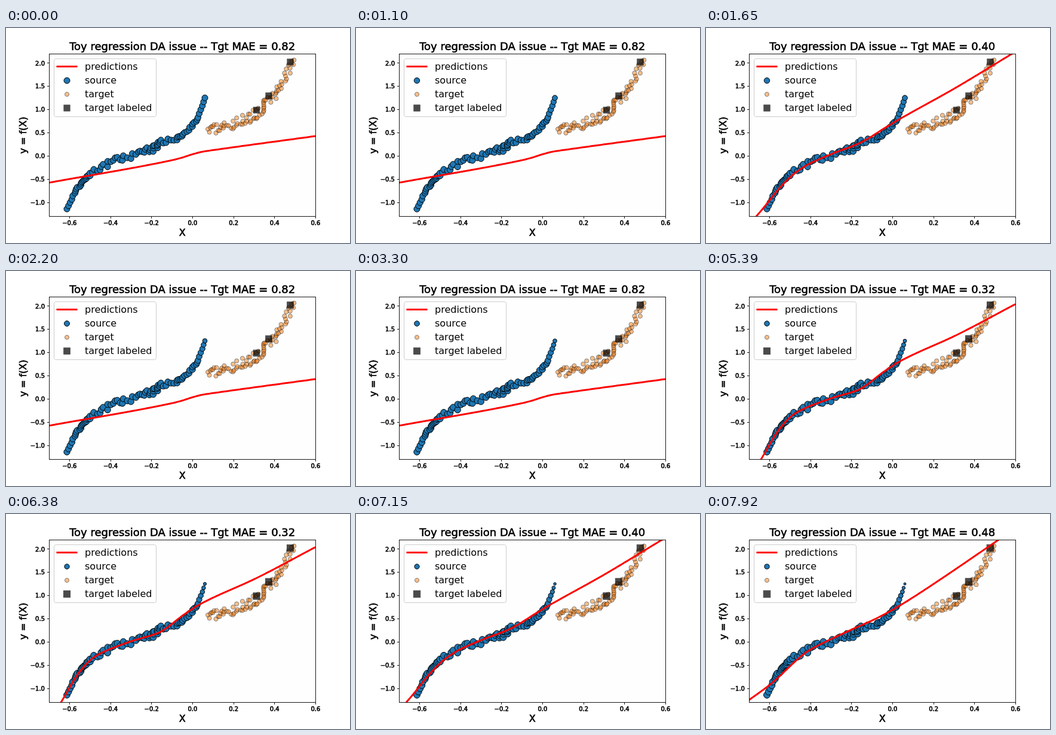
Animation, 576 px wide and 360 px high, one loop 8 s. Source, as an HTML page:

```html
<!DOCTYPE html>
<html lang="en">
<head>
<meta charset="utf-8">
<title>Toy regression</title>
<style>
  html, body { margin: 0; width: 100%; height: 100%; overflow: hidden; background: #fff; }
  svg { display: block; width: 576px; height: 360px; }
  text { font-family: "DejaVu Sans", sans-serif; font-size: 16px; fill: #000; }
  .strong { stroke: #000; stroke-width: .6px; }
  .title { font-size: 18px; }
  .tick { font-size: 10px; }
  .mid { text-anchor: middle; }
  .end { text-anchor: end; }
  .axis { stroke: #000; stroke-width: .9; fill: none; }
  .frame { fill: #fefefe; }
  .src { fill: #1f77b4; stroke: #000; stroke-width: 1; }
  .tgt { fill: #ff7f0e; stroke: #000; stroke-width: 1; opacity: .5; }
  .lab { fill: #000; stroke: #000; stroke-width: 1; opacity: .7; }
  .pred { fill: none; stroke: #f00; stroke-width: 3; stroke-linejoin: round; }
  .box { fill: #fff; fill-opacity: .8; stroke: #ccc; }
</style>
</head>
<body>
<svg viewBox="0 0 576 360">
  <clipPath id="plot"><rect x="72" y="43" width="446.5" height="272.5"/></clipPath>
  <rect class="frame" x="72" y="43" width="446" height="272"/>
  <g id="dots" clip-path="url(#plot)"></g>
  <g clip-path="url(#plot)"><path id="curve" class="pred"/></g>
  <g id="axes"><rect class="axis" x="72.5" y="43.5" width="446" height="272"/></g>
  <text id="title" class="strong title mid" x="295.2" y="37"></text>
  <text class="strong mid" x="295.2" y="348">X</text>
  <text class="strong mid" transform="translate(34 179.5) rotate(-90)">y = f(X)</text>
  <g id="legend">
    <rect class="box" x="80.5" y="51.5" width="171" height="97" rx="3"/>
    <path class="pred" d="M86 64.5H118" stroke-linecap="square"/>
    <text x="132" y="70">predictions</text>
    <text x="132" y="93">source</text>
    <text x="132" y="116">target</text>
    <text x="132" y="139">target labeled</text>
  </g>
</svg>
<script>
const $ = id => document.getElementById(id);
const dots = $('dots'), axes = $('axes'), legend = $('legend');

function add(parent, tag, attrs, text) {
  const el = document.createElementNS('http://www.w3.org/2000/svg', tag);
  for (const k in attrs) el.setAttribute(k, attrs[k]);
  if (text) el.textContent = text;
  return parent.appendChild(el);
}

const mix = (a, b, k) => a + (b - a) * k;

let seed = 7;
function random() {
  seed = (seed * 1664525 + 1013904223) % 4294967296;
  return seed / 4294967296;
}

// Same number of dots between each two keys, scattered across the path
function scatter(keys, perKey, spread) {
  const count = (keys.length - 1) * perKey;
  return Array.from({ length: count + 1 }, (_, n) => {
    const at = Math.min(n / perKey, keys.length - 1.001);
    const i = Math.floor(at);
    const [x0, y0] = keys[i], [x1, y1] = keys[i + 1];
    const len = Math.hypot(x1 - x0, y1 - y0);
    const off = (random() * 2 - 1) * spread(n / count);
    return [
      mix(x0, x1, at - i) - off * (y1 - y0) / len,
      mix(y0, y1, at - i) + off * (x1 - x0) / len
    ];
  });
}

const source = scatter([
  [102, 303], [115, 276], [124, 262], [132, 252], [141, 244], [160, 233],
  [180, 222], [198, 218], [222, 209], [237, 204], [247, 201], [254, 195],
  [263, 191], [285, 185], [296, 178], [311, 164], [322, 150], [333, 117]
], 5, t => 5.5 * Math.sin(Math.PI * t));

const target = scatter([
  [338, 169], [366, 167], [396, 155], [419, 143], [439, 124], [461, 98], [481, 53]
], 13, t => mix(11, 5, t));

const labeled = [[419.5, 137.5], [440, 113.5], [476, 57]];

// Fitted line and its error before, early in and late in training
const start = { mae: .82, keys: [[72, 259], [275, 222], [295, 217], [312, 211.5],
  [330, 207], [348, 204.3], [518, 181]] };
const early = { mae: .48, keys: [[72, 311.5], [108, 285], [170, 230], [190, 219],
  [245, 193], [285, 175], [325, 153], [360, 131], [518, 24]] };
const late = { mae: .32, keys: [[72, 348], [92, 315.5], [125, 262], [150, 238],
  [210, 213], [255, 199], [300, 167], [325, 151], [420, 107], [518, 55.5]] };

// Smooth curve through the keys, without overshoot
function heightAt(keys, x) {
  const slope = i => (keys[i + 1][1] - keys[i][1]) / (keys[i + 1][0] - keys[i][0]);
  const last = keys.length - 2;
  const tangent = i => {
    const a = slope(Math.max(0, i - 1)), b = slope(Math.min(last, i));
    return 2 * a * b / (a + b);
  };
  const i = Math.max(0, keys.findIndex(p => p[0] >= x) - 1);
  const [x0, y0] = keys[i], [x1, y1] = keys[i + 1];
  const w = x1 - x0, t = (x - x0) / w, ease = t * t * (3 - 2 * t);
  return mix(y0, y1, ease) + w * t * (1 - t) * (tangent(i) * (1 - t) - tangent(i + 1) * t);
}

const circle = (parent, cls, [cx, cy], r) => add(parent, 'circle', { class: cls, cx, cy, r });
const sources = source.map(p => circle(dots, 'src', p, 5));
target.forEach(p => circle(dots, 'tgt', p, 3.54));
const squares = labeled.map(p => [add(dots, 'rect', { class: 'lab' }), p]);

const keySource = circle(legend, 'src', [102, 88], 5);
circle(legend, 'tgt', [102, 111], 3.54);
squares.push([add(legend, 'rect', { class: 'lab' }), [102, 134]]);

const label = v => v.toFixed(1).replace('-', '\u2212');
const snap = v => Math.floor(v) + .5;
for (let i = -3; i <= 3; i++) {
  const x = 312.4 + i * 68.68;
  add(axes, 'path', { class: 'axis', d: `M${snap(x)} 315.5v3.5` });
  add(axes, 'text', { class: 'strong tick mid', x, y: 329.5 }, label(i * .2));
}
for (let i = -2; i <= 4; i++) {
  const y = 214.3 - i * 38.9;
  add(axes, 'path', { class: 'axis', d: `M72.5 ${snap(y)}h-3.5` });
  add(axes, 'text', { class: 'strong tick end', x: 65, y: y + 3.8 }, label(i * .5));
}

// Badly fitted points near the top lose weight with every round
function radius(y, round) {
  const loss = .146 * Math.exp((117 - y) / 17);
  return 5 * Math.exp(-loss * round) * (1 + .013 * round);
}

function resize(round) {
  const sizes = source.map(p => radius(p[1], round));
  sources.forEach((c, i) => c.setAttribute('r', sizes[i]));
  keySource.setAttribute('r', Math.hypot(Math.max(...sizes), Math.min(...sizes)) / Math.SQRT2);
  const half = 5.1 + .1 * round;
  for (const [el, [x, y]] of squares) {
    el.setAttribute('x', x - half);
    el.setAttribute('y', y - half);
    el.setAttribute('width', 2 * half);
    el.setAttribute('height', 2 * half);
  }
}

function predict(epoch) {
  const [a, b, k] = epoch < 2 ? [start, early, epoch * .65]
    : [early, late, Math.min(1, (epoch - 2) / 6)];
  let d = '';
  for (let x = 72; x <= 518; x += 2) {
    const y = mix(heightAt(a.keys, x), heightAt(b.keys, x), k);
    d += (d ? 'L' : 'M') + x + ' ' + y.toFixed(2);
  }
  $('curve').setAttribute('d', d);
  $('title').textContent =
    'Toy regression DA issue -- Tgt MAE = ' + mix(a.mae, b.mae, k).toFixed(2);
}

// Each round of ten steps trains the line anew
let shown = -1, origin;
function draw(now) {
  origin ??= now;
  const step = Math.floor((now - origin) % 8000 / 110);
  if (step !== shown) {
    shown = step;
    resize(Math.floor(step / 10));
    predict(step % 10);
  }
  requestAnimationFrame(draw);
}
resize(0);
predict(0);
requestAnimationFrame(draw);
</script>
</body>
</html>
```
